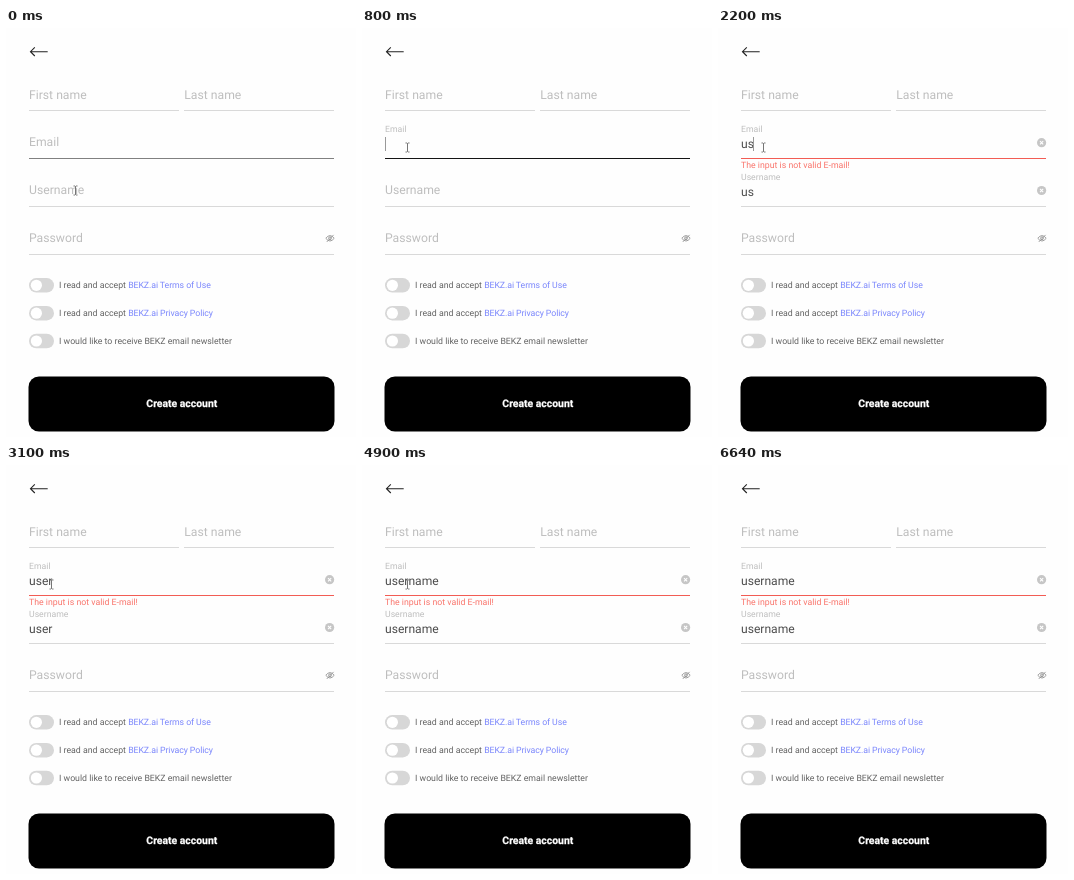
These frames come from a looping animation (350 px wide and 409 px high, 6660 ms). An HTML page:

```html
<!DOCTYPE html>
<html lang="en">
<head>
<meta charset="utf-8">
<title>Sign-up form</title>
<style>
  html, body { margin: 0; width: 100%; height: 100%; overflow: hidden; background: #fefefe; }
  svg { display: block; width: 350px; height: 409px; font-family: Roboto, Arial, sans-serif; }
  text { text-rendering: geometricPrecision; white-space: pre; }
  .hint { fill: #bebebe; font-size: 12.2px; }
  .value { fill: #4c4c4c; font-size: 12.1px; }
  .small { fill: #626262; font-size: 8.75px; }
  .link { fill: #7a86fc; letter-spacing: -.08px; }
  .rule { stroke: #d9d9d9; }
</style>
</head>
<body>
<svg viewBox="0 0 350 409">
  <defs>
    <g id="clear">
      <circle r="4.6" fill="#c6c6c6"/>
      <path d="M-1.6-1.6L1.6 1.6M1.6-1.6L-1.6 1.6" stroke="#fff" stroke-width="1.1"/>
    </g>
    <g id="toggle">
      <rect x="23" y="-7.3" width="25" height="14.6" rx="7.3" fill="#d7d7d7"/>
      <circle cx="30.4" r="5.6" fill="#fff"/>
    </g>
  </defs>
  <rect width="350" height="409" fill="#fefefe"/>
  <path d="M41.7 23.7H24.5M28.8 19.4L24.5 23.7L28.8 28" fill="none" stroke="#222" stroke-width="1.1"/>

  <text class="hint" x="23" y="71">First name</text>
  <text class="hint" x="178.3" y="71">Last name</text>
  <path class="rule" d="M23 82.5H173M178 82.5H328M23 178.5H328M23 226.5H328"/>
  <text class="hint" id="mailLabel" x="23">Email</text>
  <text class="hint" id="userLabel" x="23">Username</text>
  <text class="hint" x="23" y="214">Password</text>
  <path id="mailRule" d="M23 130.5H328" stroke-width="1.2"/>
  <text id="error" x="23" y="139.6" font-size="8.75" fill="#f9746b">The input is not valid E-mail!</text>
  <text class="value" id="mail" x="23" y="120"></text>
  <text class="value" id="user" x="23" y="168"></text>
  <g id="clears">
    <use href="#clear" x="323.6" y="114.7"/>
    <use href="#clear" x="323.6" y="162.5"/>
  </g>
  <g transform="translate(324 210.3)" fill="none" stroke="#949494" stroke-width=".9">
    <path d="M-4.2 0Q0-5.4 4.2 0Q0 5.4-4.2 0ZM-3.2 3.6L3.6-3.4"/>
    <circle r="1.4"/>
  </g>

  <use href="#toggle" y="257.3"/>
  <use href="#toggle" y="285.2"/>
  <use href="#toggle" y="313"/>
  <text class="small" x="53" y="260.4">I read and accept <tspan class="link">BEKZ.ai Terms of Use</tspan></text>
  <text class="small" x="53" y="288.4">I read and accept <tspan class="link">BEKZ.ai Privacy Policy</tspan></text>
  <text class="small" x="53" y="316">I would like to receive BEKZ email newsletter</text>

  <rect x="22.5" y="348.5" width="306" height="55" rx="10.5"/>
  <text x="175.8" y="379" text-anchor="middle" font-size="10.4" font-weight="700" fill="#fff" stroke="#fff" stroke-width=".25">Create account</text>

  <path id="caret" d="M0 109V123" stroke="#999"/>
  <g id="pointer" fill="none" stroke-linejoin="round">
    <path id="beam" d="M-2-4.5H-.7L0-4L.7-4.5H2M0-4V4M-2 4.5H-.7L0 4L.7 4.5H2" stroke="#666" stroke-width=".9"/>
    <path id="hand" d="M-1.2 8V1Q-1.2 0 0 0T1.2 1V4.6Q2.4 3.7 3.2 5Q4.4 4.3 5 5.5Q6.6 5 6.6 6.8V9.5Q6.6 11.5 5.5 13H.4Q-.8 11.3-3.6 7.8Q-3.8 6.5-2.6 6.5ZM3.2 5V7M5 5.5V7.2" fill="#fff" stroke="#6a6a6a" stroke-width=".9"/>
  </g>
</svg>
<script>
const LOOP = 6660, BLINK = 530, FOCUS = 560, LEAVE = 5990;
const WORD = 'username';
const KEYS = [1780, 2050, 2320, 2570, 3350, 3860, 4370, 4370];
const START = { x: 69.5, y: 162.5 };
const MOVES = [
  { from: 110, to: 410, x: 45.5, y: 119.5 },
  { from: 5150, to: 5480, x: 193.4, y: 264.3 },
  { from: 5620, to: LEAVE, x: 334, y: 408 },
];
const $ = id => document.getElementById(id);
const mix = (a, b, k) => a + (b - a) * k;
const ramp = (t, from, to) => Math.min(1, Math.max(0, (t - from) / (to - from)));
const easeOut = k => 1 - (1 - k) ** 2;
const show = (el, on) => el.setAttribute('visibility', on ? 'visible' : 'hidden');

function lift(label, y, k) {
  label.setAttribute('y', y - 14 * k);
  label.style.fontSize = mix(12.2, 8.7, k) + 'px';
}

function drawFields(t) {
  const count = KEYS.filter(key => key <= t).length;
  const text = WORD.slice(0, count);
  $('mail').textContent = $('user').textContent = text;
  show($('clears'), count);
  lift($('mailLabel'), 118.2, easeOut(ramp(t, 490, 800)));
  lift($('userLabel'), 166.3, count && easeOut(ramp(t, 1680, 1970)));

  const error = easeOut(ramp(t, 1880, 2200));
  const gray = mix(128, 0, ramp(t, 0, 950));
  const color = [242, 92, 84].map(c => Math.round(mix(gray, c, error)));
  $('error').setAttribute('opacity', error);
  $('mailRule').setAttribute('stroke', `rgb(${color})`);

  // The caret restarts its blink at every key press.
  const idle = t - (count ? KEYS[count - 1] : FOCUS);
  const end = count ? $('mail').getComputedTextLength() : 0;
  $('caret').setAttribute('transform', `translate(${Math.floor(23 + end) + .5} 0)`);
  show($('caret'), idle >= 0 && t < LEAVE && idle % (2 * BLINK) < BLINK);
}

function drawPointer(t) {
  let { x, y } = START;
  for (const move of MOVES) {
    const k = ramp(t, move.from, move.to);
    x = mix(x, move.x, k);
    y = mix(y, move.y, k);
  }
  const overLink = t >= MOVES[1].to;
  $('pointer').setAttribute('transform', `translate(${x} ${y})`);
  show($('beam'), !overLink);
  show($('hand'), overLink && t < LEAVE);
}

const origin = performance.now();
function tick() {
  const t = (performance.now() - origin) % LOOP;
  drawFields(t);
  drawPointer(t);
  requestAnimationFrame(tick);
}
tick();
</script>
</body>
</html>
```
